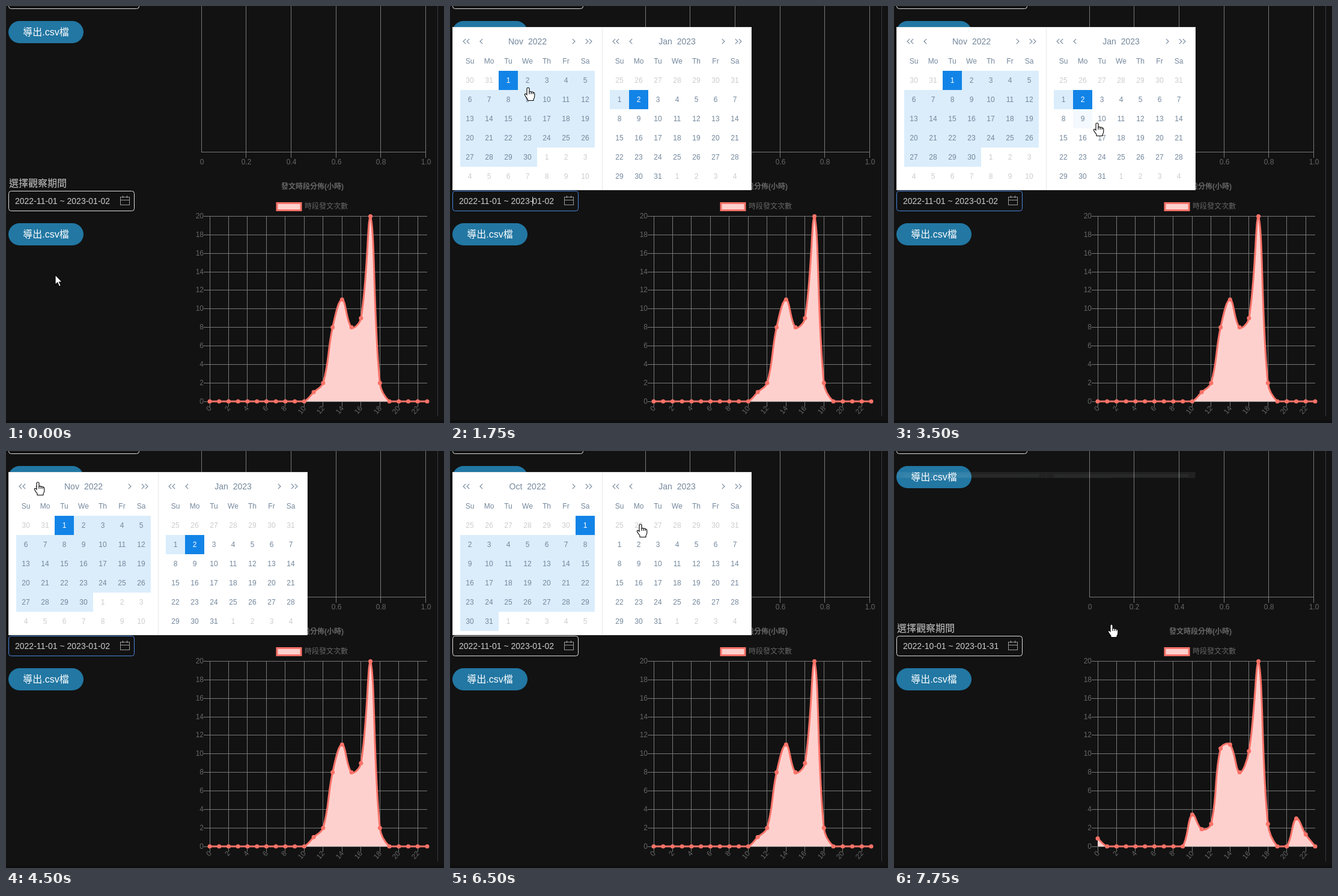
Animation, 729 px wide and 695 px high, one loop 8000 ms. Source, as an HTML page with a canvas:

```html
<!DOCTYPE html>
<html lang="zh-Hant">
<head>
<meta charset="utf-8">
<style>
  html, body { margin: 0; width: 100%; height: 100%; overflow: hidden; background: #121212; }
  canvas { display: block; }
</style>
</head>
<body>
<canvas id="stage" width="729" height="695"></canvas>
<script>
const ctx = document.getElementById('stage').getContext('2d');
const LOOP = 8000, STEP = 250;
const FONT = '"Liberation Sans", Arial, "Noto Sans CJK TC", "Noto Sans CJK JP", "Noto Sans CJK", sans-serif';
const GRID = '#787878', MUTED = '#666', SALMON = '#fa7268', PINK = '#fed0cd', SLATE = '#73879c';

const OPEN_AT = 590, PREV_CLICK = 4750, START_CLICK = 6000, CLOSE_AT = 7605, CHART_AT = 7619;

// time, x, y of the pointer tip
const POINTER = [
  [0, 82, 448], [250, 108, 402], [500, 148, 331], [750, 149, 328], [1250, 149, 328],
  [1500, 140, 235], [1750, 130, 136], [2250, 118, 132], [2500, 133, 132], [3250, 322, 184],
  [3500, 338, 195], [3750, 324, 186], [4000, 250, 150], [4500, 53, 52], [5000, 53, 50],
  [5250, 112, 100], [5500, 187, 143], [5750, 224, 132], [6000, 225, 127], [6250, 262, 140],
  [6500, 317, 122], [7000, 350, 225], [7250, 355, 282], [7500, 358, 284], [7750, 362, 289]
];
const HAND = new Path2D('M-2 2Q-2 0 0 0Q2 0 2 2V7Q4 5.8 5.2 7.4Q7.4 6.2 8.2 8.2Q10.8 7.8 10.8 10.5V14Q10.8 17 9 19V21.5H-1V19Q-4 15.5 -5.6 12.3Q-6 10 -4 10.2L-2 12Z');
const KNUCKLES = new Path2D('M2 7V11M5.2 7.5V11M8.2 8.5V11');
const ARROW = new Path2D('M0 0V16.5L3.8 13L6.5 19.5L9.3 18.3L6.6 12H11.6Z');

const BEFORE = [0, 0, 0, 0, 0, 0, 0, 0, 0, 0, 0, 1, 2, 8, 11, 8, 9, 20, 2, 0, 0, 0, 0, 0];
const AFTER = [2, 0, 0, 0, 0, 0, 0, 0, 0, 0, 8, 3, 3, 14, 11, 8, 12, 20, 3, 0, 0, 7, 3, 0];

const clamp = (v, lo, hi) => Math.min(hi, Math.max(lo, v));
const easeOut = (start, length, power, t) => 1 - (1 - clamp((t - start) / length, 0, 1)) ** power;
const day = (y, m, d) => Date.UTC(y, m, d) / 864e5;

function text(s, x, y, size, color, align = 'left', weight = '') {
  ctx.font = `${weight} ${size}px ${FONT}`;
  ctx.textAlign = align;
  ctx.fillStyle = color;
  ctx.fillText(s, x, y + size * 0.36);
}

function rect(x, y, w, h, color) {
  ctx.fillStyle = color;
  ctx.fillRect(x, y, w, h);
}

function poly(color, width, ...points) {
  ctx.beginPath();
  points.forEach(([x, y], i) => i ? ctx.lineTo(x, y) : ctx.moveTo(x, y));
  ctx.strokeStyle = color;
  ctx.lineWidth = width;
  ctx.stroke();
}

function rounded(x, y, w, h, r) {
  ctx.beginPath();
  ctx.roundRect(x, y, w, h, r);
}

function pointerAt(t) {
  const i = POINTER.findIndex(k => k[0] > t);
  if (i < 0) return POINTER[POINTER.length - 1].slice(1);
  const [a, b] = [POINTER[i - 1], POINTER[i]];
  const p = (t - a[0]) / (b[0] - a[0]);
  return [a[1] + (b[1] - a[1]) * p, a[2] + (b[2] - a[2]) * p];
}

function exportButton(y) {
  rounded(4, y, 125, 37, 18.5);
  ctx.fillStyle = '#2277a3';
  ctx.fill();
  text('導出.csv檔', 66.5, y + 18.5, 16, '#fff', 'center');
}

function field(t) {
  const focused = t >= OPEN_AT && t < PREV_CLICK;
  rounded(4.5, 308.5, 209, 33, 4);
  ctx.strokeStyle = focused ? '#4a86e0' : '#ddd';
  ctx.lineWidth = 1;
  ctx.stroke();
  const value = t < CLOSE_AT ? '2022-11-01 ~ 2023-01-02' : '2022-10-01 ~ 2023-01-31';
  text(value, 15, 325, 14, '#ccc');
  if (focused && Math.floor((t - OPEN_AT) / 530) % 2 === 0) rect(137, 318, 1, 15, '#ddd');

  if (t >= 500 && t < 1500) {
    poly('#ddd', 1.3, [193.5, 320.5], [202.5, 329.5]);
    poly('#ddd', 1.3, [202.5, 320.5], [193.5, 329.5]);
    return;
  }
  ctx.strokeStyle = '#999';
  ctx.strokeRect(190.5, 318.5, 15, 13);
  poly('#999', 1, [190, 323.5], [206, 323.5]);
  poly('#999', 1, [194.5, 316], [194.5, 320]);
  poly('#999', 1, [201.5, 316], [201.5, 320]);
}

function emptyChart() {
  for (let i = 0; i <= 5; i++) {
    const x = Math.floor(325 + i * 74.7) + 0.5;
    poly(GRID, 1, [x, 0], [x, i ? 253 : 244]);
    text(i === 0 ? '0' : (i / 5).toFixed(1), x + 0.5, 260, 12, MUTED, 'center');
  }
  poly(GRID, 1, [325, 243.5], [699, 243.5]);
}

function hourChart(t) {
  const left = 339, right = 701, top = 350.5, bottom = 659;
  const px = i => left + i * (right - left) / 23;
  const py = v => bottom - v * (bottom - top) / 20;

  text('發文時段分佈(小時)', 510, 301, 12, MUTED, 'center', 'bold');
  rect(450, 328, 42, 13, PINK);
  ctx.strokeStyle = SALMON;
  ctx.lineWidth = 3;
  ctx.strokeRect(451, 328.5, 40, 12);
  text('時段發文次數', 497, 334, 12, MUTED);

  for (let v = 0; v <= 20; v += 2) {
    const y = Math.floor(py(v)) + 0.5;
    poly(GRID, 1, [329, y], [right, y]);
    text(v, 329, y - 0.5, 12, MUTED, 'right');
  }
  for (let i = 0; i < 24; i += 2) {
    const x = Math.floor(px(i)) + 0.5;
    poly(GRID, 1, [x, top], [x, 668]);
    ctx.save();
    ctx.translate(x, 668);
    ctx.rotate(-50 * Math.PI / 180);
    text(i, 0, 0, 12, MUTED, 'right');
    ctx.restore();
  }

  const p = easeOut(CHART_AT, 1000, 4, t);
  const pts = BEFORE.map((v, i) => [px(i), py(v + (AFTER[i] - v) * p)]);
  // spline handles with tension 0.4, kept inside the plot
  const handles = pts.map((c, i) => {
    const a = pts[i - 1] || c, b = pts[i + 1] || c;
    const da = Math.hypot(c[0] - a[0], c[1] - a[1]), db = Math.hypot(b[0] - c[0], b[1] - c[1]);
    const at = k => [clamp(c[0] + k * (b[0] - a[0]), left, right), clamp(c[1] + k * (b[1] - a[1]), top, bottom)];
    return [at(-0.4 * da / (da + db)), at(0.4 * db / (da + db))];
  });
  const curve = new Path2D();
  curve.moveTo(...pts[0]);
  for (let i = 1; i < pts.length; i++) curve.bezierCurveTo(...handles[i - 1][1], ...handles[i][0], ...pts[i]);
  const area = new Path2D(curve);
  area.lineTo(right, bottom);
  area.lineTo(left, bottom);
  ctx.fillStyle = PINK;
  ctx.fill(area);
  ctx.strokeStyle = SALMON;
  ctx.lineWidth = 3;
  ctx.stroke(curve);
  ctx.fillStyle = SALMON;
  for (const [x, y] of pts) {
    ctx.beginPath();
    ctx.arc(x, y, 3.5, 0, 7);
    ctx.fill();
  }
}

function monthCells(x0, year, month) {
  const first = day(year, month, 1);
  const offset = new Date(first * 864e5).getUTCDay() || 7;
  return Array.from({ length: 42 }, (_, i) => {
    const date = first - offset + i, d = new Date(date * 864e5);
    return {
      date, label: d.getUTCDate(), current: d.getUTCMonth() === month,
      x: x0 + 12 + i % 7 * 32, y: 108 + Math.floor(i / 7) * 32
    };
  });
}

function calendar(x0, title, year, cells, [start, end], hover) {
  const mid = x0 + 124;
  ctx.font = `14px ${FONT}`;
  const nameWidth = ctx.measureText(title).width;
  const edge = mid - (nameWidth + 8 + ctx.measureText(year).width) / 2;
  text(title, edge, 59, 14, SLATE);
  text(year, edge + nameWidth + 8, 59, 14, SLATE);
  for (const side of [-1, 1])
    for (const d of [79, 101, 107]) {
      const tip = mid + side * d, back = tip - side * 4.2;
      poly(SLATE, 1.1, [back, 54.8], [tip, 59], [back, 63.2]);
    }
  ['Su', 'Mo', 'Tu', 'We', 'Th', 'Fr', 'Sa'].forEach((s, i) =>
    text(s, x0 + 28 + i * 32, 92, 12, SLATE, 'center'));

  for (const c of cells) {
    const picked = c.current && (c.date === start || c.date === end.picked);
    const between = c.current && c.date > start && c.date < end.date;
    const fill = picked ? '#1284e7' : between ? '#dbedfb' : c.current && c === hover ? '#f3f9fe' : '';
    if (fill) rect(c.x, c.y, 32, 32, fill);
    text(c.label, c.x + 16, c.y + 16, 12, picked ? '#fff' : c.current ? SLATE : '#ccc', 'center');
  }
}

function picker(t, [mx, my]) {
  const shown = easeOut(OPEN_AT, 300, 5, t) - easeOut(CLOSE_AT, 300, 5, t);
  if (shown <= 0) return;
  const month = t < PREV_CLICK ? 10 : 9;
  const leftCells = monthCells(5, 2022, month), rightCells = monthCells(254, 2023, 0);
  const hotX = mx - 10;
  const hover = [...leftCells, ...rightCells].find(c =>
    hotX >= c.x && hotX < c.x + 32 && my >= c.y && my < c.y + 32);

  let range;
  if (t < START_CLICK) {
    const last = day(2023, 0, 2);
    range = [day(2022, 10, 1), { date: last, picked: last }];
  } else {
    range = [day(2022, 9, 1), { date: hover ? hover.date : 0 }];
  }

  ctx.save();
  ctx.globalAlpha = shown;
  ctx.translate(0, 35);
  ctx.scale(1, shown);
  ctx.translate(0, -35);
  rect(4, 35, 498, 272, '#e8e8e8');
  rect(5, 36, 496, 270, '#fff');
  rect(253, 36, 1, 270, '#e8e8e8');
  calendar(5, month === 10 ? 'Nov' : 'Oct', '2022', leftCells, range, hover);
  calendar(254, 'Jan', '2023', rightCells, range, hover);
  ctx.restore();
}

function pointer(t, [x, y]) {
  ctx.save();
  ctx.translate(x, y);
  if (t >= 500 && t < 1500) {
    poly('#fff', 1, [-3.5, -7.5], [-1, -7.5], [0.5, -6.5], [2, -7.5], [4.5, -7.5]);
    poly('#fff', 1, [-3.5, 7.5], [-1, 7.5], [0.5, 6.5], [2, 7.5], [4.5, 7.5]);
    poly('#fff', 1, [0.5, -7], [0.5, 7]);
  } else {
    const shape = t < 500 ? ARROW : HAND;
    ctx.fillStyle = '#fff';
    ctx.strokeStyle = '#000';
    ctx.lineWidth = 1.1;
    ctx.fill(shape);
    ctx.stroke(shape);
    if (shape === HAND) ctx.stroke(KNUCKLES);
  }
  ctx.restore();
}

function draw(t) {
  const at = pointerAt(t);
  rect(0, 0, 729, 695, '#121212');
  rect(0, 691, 729, 4, '#0e0e0e');
  rect(718, 0, 1, 684, '#3a3648');
  rounded(4.5, -29.5, 217, 34, 4);
  ctx.strokeStyle = '#ddd';
  ctx.lineWidth = 1;
  ctx.stroke();
  exportButton(25);
  text('選擇觀察期間', 5, 295, 16, '#c8c8c8');
  field(t);
  exportButton(362);
  emptyChart();
  hourChart(t);
  picker(t, at);
  pointer(t, at);
}

const begin = performance.now();
function frame() {
  const t = (performance.now() - begin) % LOOP;
  draw(Math.floor(t / STEP) * STEP);
  requestAnimationFrame(frame);
}
frame();
</script>
</body>
</html>
```
